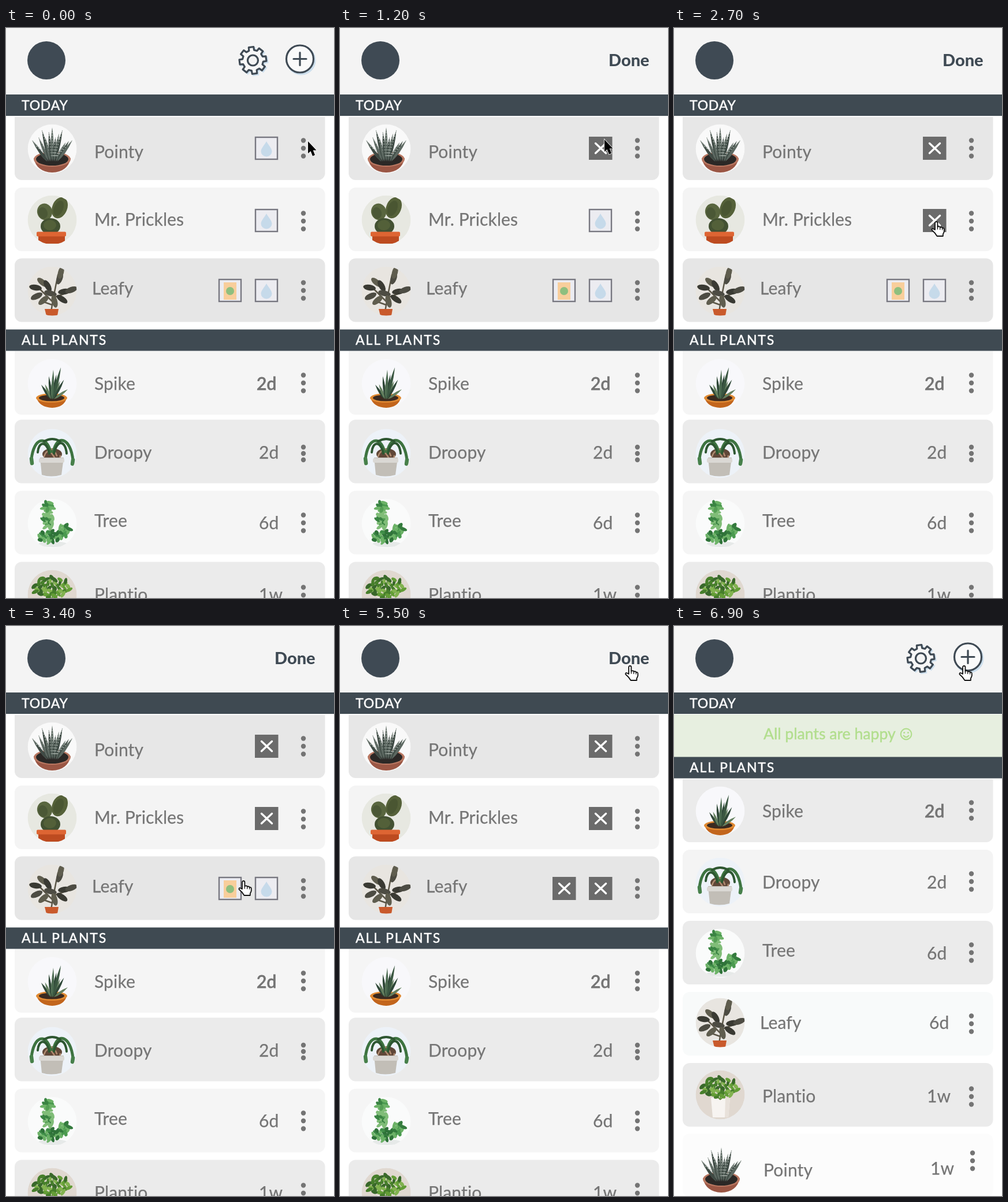
Animation of 568 by 986 pixels, one loop 7 s. Source, as an HTML page:

```html
<!DOCTYPE html>
<html lang="en">
<head>
<meta charset="utf-8">
<title>Plant care list</title>
<style>
  html, body { margin: 0; width: 100%; height: 100%; overflow: hidden; background: #fff; }
  svg { display: block; width: 100vw; height: 100vh; }
  text { font-family: Lato, "Open Sans", sans-serif; }
  .row { font-size: 30px; fill: #757575; stroke: #757575; stroke-width: .25; letter-spacing: .15px; }
  .bold { stroke-width: 1; }
  .bar { font-size: 23px; fill: #fff; stroke: #fff; stroke-width: .5; }
  .done { font-size: 29px; font-weight: 800; fill: #3f4a54; }
  .happy { font-size: 26.6px; fill: #b2de8e; stroke: #b2de8e; stroke-width: .5; }
</style>
</head>
<body>
<svg id="stage" viewBox="0 0 568 986" xmlns="http://www.w3.org/2000/svg"></svg>
<script>
const INK = '#3f4a54';
const LOOP = 7000, STEP = 100;
const HEADER_OPEN = 700, ALL_HAPPY = 5600;

// Shape helpers
const rect = (x, y, w, h, fill, more = '') =>
  `<rect x="${x}" y="${y}" width="${w}" height="${h}" fill="${fill}" ${more}/>`;
const oval = (x, y, rx, ry, fill, turn = 0) =>
  `<ellipse rx="${rx}" ry="${ry}" fill="${fill}" transform="translate(${x} ${y}) rotate(${turn})"/>`;
const path = (d, fill, more = '') => `<path d="${d}" fill="${fill}" ${more}/>`;
const line = (d, color, width, more = '') =>
  path(d, 'none', `stroke="${color}" stroke-width="${width}" stroke-linecap="round" ${more}`);
const text = (cls, x, y, words, more = '') => `<text class="${cls}" x="${x}" y="${y}" ${more}>${words}</text>`;
const group = (id, body) => `<g id="${id}">${body}</g>`;
const at = (x, y, body, more = '') => `<g transform="translate(${x} ${y})" ${more}>${body}</g>`;

// A pointed leaf, widest near its root
function blade(x0, y0, x1, y1, width, color) {
  const length = Math.hypot(x1 - x0, y1 - y0);
  const nx = (y1 - y0) / length * width, ny = (x0 - x1) / length * width;
  const mx = x0 + (x1 - x0) * .4, my = y0 + (y1 - y0) * .4;
  return path(`M${x0} ${y0}Q${mx + nx} ${my + ny} ${x1} ${y1}Q${mx - nx} ${my - ny} ${x0} ${y0}Z`, color);
}

// Small leaves scattered evenly in an oval patch
function foliage(count, x, y, rx, ry, colors, size = 4) {
  let seed = 7919 * count + 104729;
  const random = () => (seed = (seed * 16807) % 2147483647) / 2147483647;
  let out = '';
  for (let i = 0; i < count; i++) {
    const a = i * 2.4, r = Math.sqrt((i + .5) / count);
    out += oval(x + rx * r * Math.cos(a), y + ry * r * Math.sin(a), size + random() * 3, size * .6 + random(),
      colors[Math.floor(random() * colors.length)], random() * 180);
  }
  return out;
}

// Plants, each centred on the middle of its round picture
const plants = {
  Pointy() {
    let out = path('M-32 16Q-27 40 0 41Q27 40 32 16Z', '#9a5644') +
      oval(0, 18, 32, 13, '#b97862') + oval(0, 18, 28, 11, '#2b2826');
    for (let i = 0; i < 13; i++) {
      const a = (i - 6) / 6, x = a * 35, y = -37 + a * a * 22 + (i * 5 % 3) * 8;
      out += blade(a * 9, 22, x, y, 5, i % 2 ? '#3f4b45' : '#5d6962') +
        line(`M${a * 9} 12L${x} ${y}`, '#aab3ac', 1.5, 'stroke-dasharray=".5 4.500"');
    }
    return out;
  },
  Prickles: () => oval(-13, -14, 13, 14.5, '#59663f', -15) + oval(-16, -12, 8, 10, '#4b5836', -15) +
    oval(13, -21, 13, 19, '#556139', 22) + oval(11, -20, 8, 14, '#4a5632', 22) +
    oval(-3, 11, 17, 14, '#435132') + oval(-4, 9, 11, 9, '#536039') +
    rect(-24, 26, 46, 15, '#bd4b20') + rect(-27, 20.5, 51, 8, '#de6533', 'rx="2"'),
  Leafy() {
    const spots = [[-29, -6, 10], [-27, 9, 155], [-17, -15, 40], [-8, -9, 60], [13, -22, -70], [15, -32, -75],
      [21, 1, -8], [33, -2, -20], [-15, 16, 140], [17, 14, 35], [-3, 4, 15], [4, 18, 75]];
    return line('M-2 36Q2 10 10 -28M0 18L-24 -6M1 12L28 2M0 24L-17 18', '#5a5546', 2.5) +
      spots.map(([x, y, turn], i) => oval(x, y, 11, 5, ['#3a3a33', '#4d4c43', '#5f5d4e'][i % 3], turn)).join('') +
      path('M-13 31H11L9 43H-10Z', '#c95a2c');
  },
  Spike() {
    let out = path('M-27 25Q-22 41 0 42Q21 41 25 25Z', '#c2651c') +
      oval(-1, 25, 27, 8, '#e08a33') + oval(-1, 25, 22, 5.5, '#3b2a20');
    for (let i = 0; i < 8; i++) {
      const a = (i - 3.5) / 3.5;
      out += blade(a * 3, 27, 4 + a * 23, -16 + a * a * 18 + (i % 2) * 8, 4.5, i % 2 ? '#64805f' : '#2e4737');
    }
    return out + blade(1, 28, 15, -28, 5, '#3a5741') + blade(0, 28, 2, -24, 4.5, '#4b6a50');
  },
  Droopy: () => oval(0, 1, 17, 10, '#5f4738') +
    line('M-14 5Q-8 -12 2 4T14 4M-8 -6Q2 -12 8 4', '#b08b70', 2.5) +
    path('M-21 7H20L16 37Q-2 42 -18 37Z', '#c2beb7') + rect(-23, 8, 44, 8, '#dad8d4', 'rx="3"') +
    line('M-3 -3C-10 -32 -32 -28 -36 10M2 -3C8 -34 32 -28 36 12', '#3d7340', 5) +
    line('M-5 0C-10 -24 -24 -20 -25 -2M3 0C9 -26 23 -22 25 0M-14 -21Q0 -29 14 -21', '#2d5631', 4) +
    line('M-36 9L-35 17M36 11L35 18', '#47804a', 6.5),
  Tree: () => oval(1, 36, 25, 5, '#e6e9e8') + line('M-8 -30L0 30M2 27L22 7', '#577a48', 2.5) +
    foliage(12, -7, -29, 9, 8, ['#4a9a4f', '#6cb267', '#3a8443']) +
    foliage(18, -7, -7, 9, 18, ['#559f55', '#3a8443', '#80bd78']) +
    foliage(24, -4, 23, 21, 10, ['#3f8d48', '#2f7339', '#6cb267']) +
    foliage(14, 21, 12, 9, 11, ['#4a9a4f', '#6cb267', '#347b3e']),
  Plantio: () => path('M-16 5H17L14 39H-13Z', '#f7f4f1') + path('M9 5H17L14 39H8Z', '#e8e1da') +
    line('M0 8L-22 -12M0 8L2 -28M0 8L24 -10', '#5f8d39', 2) +
    foliage(44, -1, -13, 32, 18, ['#639d36', '#82b24f', '#477f2b', '#39682a'])
};
const backdrops = { Pointy: '#f9f9f9', Prickles: '#e7e8e1', Leafy: '#e8e5e0', Spike: '#f8f8fb',
  Droopy: '#edf2f8', Tree: '#fafbfb', Plantio: '#e0d8d0' };

const picture = (key, x, y, bare) =>
  at(x, y, (bare ? '' : oval(0, 0, 42.5, 42.5, backdrops[key])) + plants[key](), 'clip-path="url(#disc)"');

const dots = (x, y, gap = 13.5) => [-gap, 0, gap].map(d => oval(x, y + d, 4.2, 4.2, '#747474')).join('');

// Cards right below a bar have square top corners
function card(top, height, fill, square) {
  if (!square) return rect(15, top, 537.5, height, fill, 'rx="12"');
  return path(`M15 ${top}h537.5v${height - 12}a12 12 0 0 1-12 12h-513.5a12 12 0 0 1-12-12z`, fill);
}

function row({ key, name = key, top, h = 110, fill, square, photo, base, dot, gap, due, dueX = 438, dueY = base, bold, dx = 0 }) {
  const nameX = key === 'Leafy' ? 149 : 153 + dx;
  return card(top, h, fill, square) + picture(key, 80 + dx, photo, dx > 0) +
    text('row', nameX, base, name) + dots(515 + dx, dot, gap) +
    (due ? text(bold ? 'row bold' : 'row', dueX, dueY, due) : '');
}

const bar = (y, words, spacing) =>
  rect(0, y, 568, 37, '#3f4a52') + text('bar', 27, y + 26.5, words, `letter-spacing="${spacing}"`);

// Check boxes
const drop = path('M0-13C3-7 9.5-1 9.5 4.500A9.500 9 0 0 1-9.500 4.500C-9.500-1-3-7 0-13Z', '#c6daea');
const packet = rect(-11, -15, 22, 30, '#f8ce9b') + oval(0, 0, 7, 7, '#8fbf7f');
const checkbox = (id, x, y, icon) => at(x, y,
  group(id + 'Open', rect(-19, -19, 38, 38, '#ececf1', 'stroke="#777780" stroke-width="2.4"') + at(0, 1, icon)) +
  group(id + 'Ticked', rect(-20, -20, 40.5, 40, '#6b6b6b') + line('M-8.500-8.500L9.500 8.500M9.500-8.500L-8.500 8.500', '#fff', 3.4)));
const boxes = [
  { id: 'pointyWater', x: 451, y: 208, time: HEADER_OPEN, icon: drop },
  { id: 'pricklesWater', x: 451, y: 333, time: 2600, icon: drop },
  { id: 'leafySeed', x: 388, y: 454, time: 3800, icon: packet },
  { id: 'leafyWater', x: 451, y: 454, time: 4800, icon: drop }
];

// Header buttons
function gearPath() {
  const points = [];
  for (let i = 0; i < 8; i++)
    for (const [turn, r] of [[-.25, 18], [-.18, 23.5], [.18, 23.5], [.25, 18]]) {
      const a = i * Math.PI / 4 - .13 + turn;
      points.push(`${(r * Math.cos(a)).toFixed(2)} ${(r * Math.sin(a)).toFixed(2)}`);
    }
  return `M${points.join('L')}Z`;
}
const outline = `stroke="${INK}" stroke-width="3.2" stroke-linejoin="round"`;
const gear = at(429.5, 58, path(gearPath(), '#cddfed', 'stroke="#cddfed" stroke-width="3"')) +
  at(427.5, 56, path(gearPath(), '#f7f7f7', outline) + `<circle r="9" fill="#f4f4f4" ${outline}/>`);
const plus = oval(511, 56, 25.5, 25.5, '#cddfed') +
  at(509, 53.5, `<circle r="23.5" fill="#fafafa" ${outline}/>` + line('M-11 0H11M0-11V11', INK, 3.2));

const todayRows = [
  { key: 'Pointy', top: 154, h: 109, fill: '#e7e7e7', square: true, photo: 209, base: 225, dot: 208 },
  { key: 'Prickles', name: 'Mr. Prickles', top: 276, fill: '#f4f4f4', photo: 332, base: 342, dot: 334 },
  { key: 'Leafy', top: 398.5, fill: '#e6e6e6', photo: 455, base: 461, dot: 454 },
  { key: 'Spike', top: 559, fill: '#f5f5f5', square: true, photo: 615, base: 626, dot: 614, due: '2d', dueX: 434, bold: true },
  { key: 'Droopy', top: 677.5, fill: '#ebebeb', photo: 736, base: 745, dot: 736, gap: 11, due: '2d' },
  { key: 'Tree', top: 800.5, fill: '#f5f5f5', photo: 857, base: 863, dot: 856, due: '6d', dueY: 867 },
  { key: 'Plantio', top: 923.5, fill: '#ebebeb', photo: 980, base: 991, dot: 981, due: '1w' }
];
const happyRows = [
  { key: 'Spike', top: 265, h: 109, fill: '#ebebeb', square: true, photo: 320, base: 331, dot: 319, due: '2d', dueX: 434, bold: true },
  { key: 'Droopy', top: 387, fill: '#f4f4f4', photo: 443, base: 454, dot: 442, due: '2d' },
  { key: 'Tree', top: 510, fill: '#ebebeb', photo: 566, base: 572, dot: 565, due: '6d', dueY: 577 },
  { key: 'Leafy', top: 633, fill: '#f8fafa', photo: 686, base: 697, dot: 688, due: '6d', dueX: 442 },
  { key: 'Plantio', top: 756, fill: '#ebebeb', photo: 811, base: 824, dot: 814, due: '1w' },
  { key: 'Pointy', top: 878, fill: '#fcfcfc', photo: 939, base: 952, dot: 925, due: '1w', dueX: 444, dueY: 949, dx: 2 }
];

const smiley = at(402, 187, '<circle r="9.3" fill="none" stroke="#b2de8e" stroke-width="2.2"/>' +
  oval(-3.4, -2.5, 1.5, 1.5, '#b2de8e') + oval(3.4, -2.5, 1.5, 1.5, '#b2de8e') +
  line('M-4.500 2.500Q0 8 4.500 2.500', '#b2de8e', 2));
const arrow = path('M0 0V21L4.600 17L8 25.500L12 23.800L8.700 15.500H14.500Z', '#000',
  'stroke="#fff" stroke-width="1.5" paint-order="stroke"');
const hand = path('M7 15V3.200a2.200 2.200 0 0 1 4.400 0V10q3.800-1.500 4.300.8 3.400-1 3.900 1.200 3.400-.6 3.200 3V18q-.8 3-2 4.500V26H10.500Q7 20 1.500 15.500Q1 11 7 15Z',
  '#fff', 'stroke="#111" stroke-width="1.8" stroke-linejoin="round"') +
  line('M11.400 10v4M15.700 11v3.500M19.600 12v3', '#111', 1.3);

const stage = document.getElementById('stage');
stage.innerHTML =
  '<clipPath id="disc"><circle r="42.5"/></clipPath>' +
  rect(0, 0, 568, 986, '#fff') + rect(0, 0, 568, 115, '#f4f4f4') +
  oval(70, 56, 33, 33, INK) +
  group('buttons', gear + plus) +
  group('done', text('done', 465, 66, 'Done')) +
  group('todayList', todayRows.map(row).join('') +
    boxes.map(b => checkbox(b.id, b.x, b.y, b.icon)).join('') + bar(521.5, 'ALL PLANTS', 1.9)) +
  group('happyList', rect(0, 153, 568, 74, '#e7efe0') +
    text('happy', 155, 196, 'All plants are happy') + smiley +
    happyRows.map(row).join('') + bar(226.5, 'ALL PLANTS', 1.9)) +
  bar(115, 'TODAY', .8) +
  group('arrow', arrow) + group('hand', hand);

// Pointer track: time, x, y
const track = [
  [0, 523, 196], [100, 520, 196], [500, 459, 194], [1200, 458, 193], [1600, 454, 300], [1700, 454, 300],
  [2000, 449, 401], [2100, 449, 401], [2400, 452, 335], [2600, 452, 335], [2800, 438, 333], [2900, 438, 333],
  [3400, 402, 440], [3700, 400, 443], [4000, 400, 443], [4300, 467, 452], [4400, 456, 451], [4800, 456, 451],
  [5500, 493, 68], [7000, 493, 68]
];
const handTimes = [[2300, 4100], [5300, LOOP]];

function pointer(t) {
  const next = track.findIndex(p => p[0] > t);
  const [t0, x0, y0] = track[next - 1], [t1, x1, y1] = track[next];
  const u = (t - t0) / (t1 - t0), k = u * u * (3 - 2 * u);
  return [x0 + (x1 - x0) * k, y0 + (y1 - y0) * k];
}

const parts = Object.fromEntries([...stage.querySelectorAll('g[id]')].map(g => [g.id, g]));
const show = (id, on) => parts[id].setAttribute('display', on ? 'inline' : 'none');

function draw(ms) {
  const t = Math.floor(ms % LOOP / STEP) * STEP;
  const happy = t >= ALL_HAPPY, editing = t >= HEADER_OPEN && !happy;
  show('buttons', !editing);
  show('done', editing);
  show('todayList', !happy);
  show('happyList', happy);
  for (const { id, time } of boxes) {
    show(id + 'Open', t < time);
    show(id + 'Ticked', t >= time);
  }
  const pointing = handTimes.some(([from, to]) => t >= from && t < to);
  show('hand', pointing);
  show('arrow', !pointing);
  const [x, y] = pointer(t);
  parts[pointing ? 'hand' : 'arrow'].setAttribute('transform', `translate(${x.toFixed(1)} ${y.toFixed(1)})`);
}

const start = performance.now();
function tick() {
  draw(performance.now() - start);
  requestAnimationFrame(tick);
}
tick();
</script>
</body>
</html>
```
